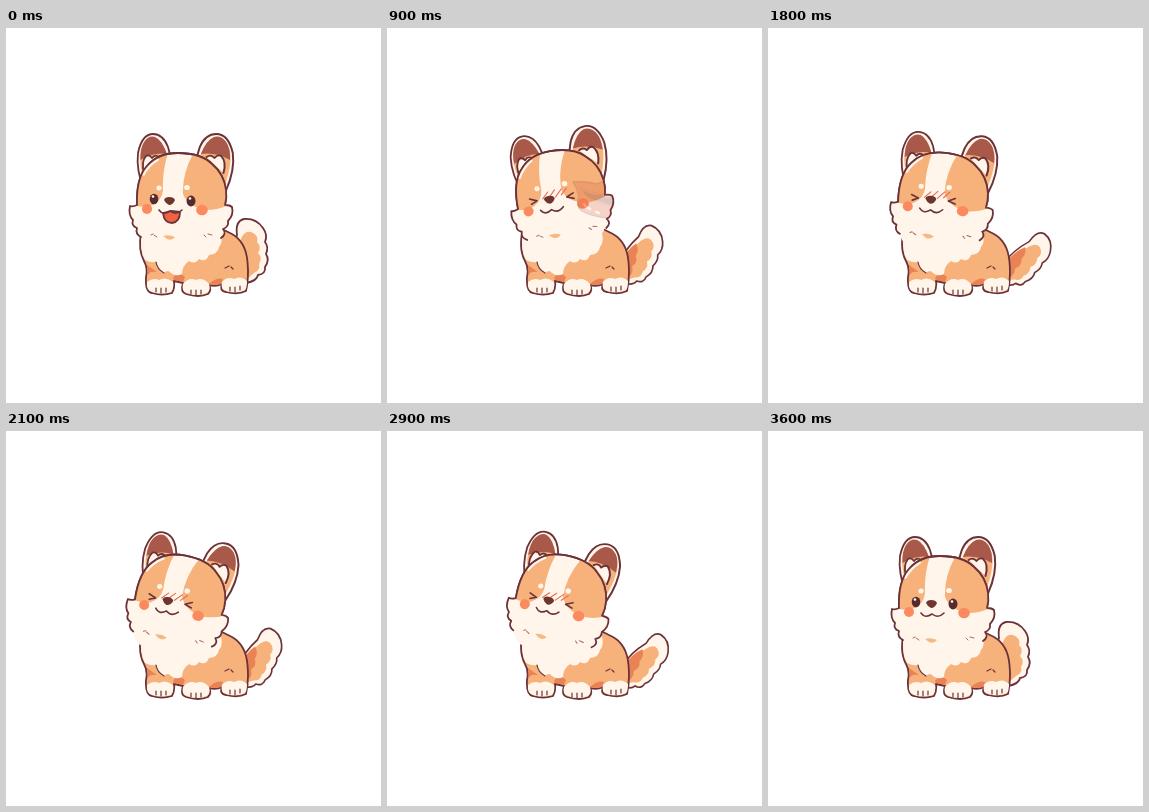
Recreate the animation shown at these times as an HTML page. Size 375 by 375 pixels, loop 3750 ms.

```html
<!DOCTYPE html>
<html lang="en">
<head>
<meta charset="utf-8">
<title>Kissed puppy</title>
<style>
html, body { margin: 0; width: 100%; height: 100%; overflow: hidden; background: #fff; }
svg { display: block; width: 100%; height: 100%; }
.line { stroke: #6b3339; stroke-width: 1.8; stroke-linecap: round; stroke-linejoin: round; }
.thin { fill: none; stroke: #6b3339; stroke-width: 1.2; stroke-linecap: round; stroke-linejoin: round; }
.fur { fill: #f7b27b; }
.shade { fill: #e98356; }
.cream { fill: #fff5ea; }
.dark { fill: #582a2e; }
.blush { fill: #fb8a5e; }
.none { fill: none; }
</style>
</head>
<body>
<svg viewBox="0 0 375 375">
  <defs>
    <g id="ear">
      <path class="cream line" d="M138 162Q130 142 132 125Q136 106 147 106Q157 106 162 119L165 130L150 148Z"/>
      <path class="fur" d="M139 156Q132 134 135 122Q140 108 148 109Q156 111 162 129L148 148Z"/>
      <path fill="#a9594a" d="M134.500 132Q134 120 138 114Q143 107 149 109Q156 112 161 126Q148 124 134.500 132Z"/>
    </g>
    <path id="tuft" class="cream line" d="M138 145Q135 134 140 128Q143 126 146 130Q149 126 153 129"/>
    <path id="face" d="M135 209Q129 206 131 200Q125 198 127 192Q122 187 124 178Q127 179 131 177Q130 150 141 138Q152 125 172 125Q195 125 206 136Q218 146 220 162Q221 170 219 177Q224 177 226 179Q228 187 222 193Q223 199 217 201Q221 206 215 210"/>
    <g id="lips">
      <path fill="#d64b3e" stroke="#702a27" stroke-width="1.3" stroke-linejoin="round" d="M186 154Q198 153 210 156Q215 152 222 157Q230 153 236 160Q238 172 243 181Q233 187 222 190Q205 189 195 183Q188 178 192 168Q190 160 186 154Z"/>
      <path fill="#b53730" d="M190 157Q203 163 215 165Q229 168 240 180Q224 181 211 176Q198 172 190 157Z"/>
      <path fill="#451619" d="M196 163Q208 169 214 166Q219 171 224 170L236 178Q222 178 212 173Q202 172 196 163Z"/>
      <path fill="none" stroke="#ffe9e2" stroke-width="2.4" stroke-linecap="round" d="M197 176Q199 180 203 181M209 184L212 185M227 162L231 164"/>
    </g>
    <clipPath id="skull"><path d="M131 182Q130 150 141 138Q152 125 172 125Q195 125 206 136Q218 146 220 162Q221 170 219 184Z"/></clipPath>
    <clipPath id="onFace"><use id="faceMask" href="#face"/></clipPath>
  </defs>

  <g id="tail">
    <path class="cream line" d="M226 240Q224 224 231 207Q229 193 238 191Q250 190 257 200Q262 207 259 214Q263 219 260 226Q264 232 259 239Q260 246 252 247Q251 253 240 255Z"/>
    <path class="fur" d="M228 240Q226 222 234 213Q238 202 245 204Q253 207 251 214Q256 219 252 225Q257 230 253 236Q255 242 248 245L239 253Z"/>
    <path class="shade" d="M227 240Q226 224 232 214Q239 218 238 225Q244 230 240 236Q247 243 239 253Z"/>
  </g>

  <path class="fur line" d="M135 205Q132 222 138 233Q142 240 140 249Q139 264 146 265Q156 268 166 265Q169 260 168 253L177 255Q174 264 180 266Q193 270 202 266Q206 262 203 257Q210 259 216 256Q213 263 220 264Q232 267 240 263Q243 250 241.500 234Q240 214 226 206L214 200"/>
  <path class="shade" d="M167 250Q172 242 179 249L177 254L168 252ZM203 256Q211 249 217 251L215 256Q209 258 203 256ZM141 237L151 244Q143 243 142 247Z"/>
  <path class="cream" d="M136 204Q133 222 139 232Q145 235 150 234Q151 241 158 245Q162 241 165 245Q170 249 176 246Q176 238 183 233Q189 237 193 231Q200 235 203 227Q212 226 213 219Q218 214 214 202Z"/>
  <path class="thin" d="M150 234Q151 241 158 245"/>
  <g class="cream">
    <path d="M141 254Q147 249 153 252Q160 248 167 254Q168 260 165 264Q155 267 146 264Q140 262 141 254Z"/>
    <path d="M177 256Q183 249 190 252Q197 249 203 256Q205 262 201 265Q190 269 181 265Q175 263 177 256Z"/>
    <path d="M216 254Q221 248 228 251Q235 247 241 253Q241 260 239 262Q230 266 220 263Q214 261 216 254Z"/>
  </g>
  <path class="thin" d="M150 260V264M155 260V265M160 260V264M185 262V266M190 262V267M195 262V266M224 259V263M229 259V264M234 258V262M219 240L223 238M225 239L227 241"/>

  <g id="head">
    <use href="#ear"/>
    <use href="#ear" transform="translate(372 0) scale(-1.1 1)"/>
    <use href="#tuft"/>
    <use href="#tuft" transform="translate(372 0) scale(-1.12 1)"/>
    <path class="cream" d="M134 200Q134 218 147 222Q172 230 202 221Q215 214 216 200Z"/>
    <use href="#face" class="cream line"/>
    <g clip-path="url(#skull)">
      <path class="fur" d="M162 125Q138 128 131 150V178Q140 180 147 177Q156 172 157 162Q156 144 162 125ZM187 126Q176 146 177 166Q182 179 200 182Q212 182 222 177V150Q210 127 187 126Z"/>
      <path fill="none" stroke="#fff5ea" stroke-width="4.600" d="M136 147Q141 137 152 130"/>
    </g>
    <path class="none line" d="M131 177Q130 150 141 138Q152 125 172 125Q195 125 206 136Q218 146 220 162Q221 170 219 177"/>
    <ellipse class="cream" cx="153" cy="160" rx="2.6" ry="2.5"/>
    <ellipse class="cream" cx="181" cy="159.5" rx="2.8" ry="2.6"/>
    <ellipse class="blush" cx="141" cy="181" rx="5" ry="5"/>
    <ellipse class="blush" cx="196" cy="182" rx="5.8" ry="5.2"/>
    <g id="eyesOpen">
      <ellipse class="dark" cx="148" cy="171" rx="4.3" ry="5.3"/>
      <ellipse class="dark" cx="185" cy="173" rx="4.5" ry="5.4"/>
      <g fill="#fff"><circle cx="147" cy="168.5" r="1.3"/><circle cx="184" cy="170.5" r="1.3"/></g>
    </g>
    <g id="eyesShut">
      <path class="thin" style="stroke-width:1.6" d="M144 169L151 172L145 174.500M188 170L181 173L188 175.500"/>
      <path fill="none" stroke="#e9684f" stroke-width="1.1" stroke-linecap="round" d="M157 171L163 165M163 171L170 164M170 171L177 164M176 170L182 164"/>
    </g>
    <path id="mouthOpen" class="line" fill="#ef6340" d="M157 185Q158 195 166 195Q174 194 174 184L165 183Z"/>
    <path class="thin" style="stroke-width:1.6" d="M153 182Q157 188 164 183Q170 188 176 182"/>
    <path fill="#6f3630" d="M158 172Q159 169 163 169Q168 169 169 172Q167 177 163 177Q160 176 158 172Z"/>
    <path fill="#f7b983" d="M157 208Q163 206 169 209Q166 213 161 211Z"/>
    <path class="thin" style="stroke:#a66b60;stroke-width:1" d="M145 207L147 206M148 207L151 209M198 207L200 209M202 206L206 207"/>
  </g>

  <g id="kisses">
    <use id="kissRight" href="#lips"/>
    <use id="kissLeft" href="#lips" transform="translate(330 -8) scale(-1 1)"/>
  </g>
</svg>
<script>
const LOOP = 3750, STEP = 50;
const tilts = [[0, 0], [350, -9.3], [1020, -9.3], [1390, 0], [1560, 0], [2130, 10.3],
               [2300, 11.2], [2900, 11.5], [3220, 10.7], [3590, 0], [LOOP, 0]];
const part = id => document.getElementById(id);
const show = (id, on) => part(id).style.display = on ? "" : "none";
const clamp = x => Math.max(0, Math.min(1, x));
const smooth = x => x * x * (3 - 2 * x);

function tiltAt(t) {
  const i = tilts.findIndex(key => key[0] > t);
  const [t0, a] = tilts[i - 1], [t1, b] = tilts[i];
  return a + (b - a) * smooth((t - t0) / (t1 - t0));
}

function wagAt(t) {
  const phase = (t - 655) / 338;
  return phase > 0 && phase < 7 ? (1 - Math.cos(2 * Math.PI * phase)) / 2 : 0;
}

// Lips land at full strength, then fade away.
const kissAt = (t, start) => t < start ? 0 : 1 - clamp((t - start - 200) / 250);

function draw(t) {
  const tilt = tiltAt(t), lean = Math.abs(tilt), wag = wagAt(t);
  const pose = `translate(${-0.15 * lean} ${-0.2 * lean}) rotate(${tilt} 168 171)`;
  part("head").setAttribute("transform", pose);
  part("faceMask").setAttribute("transform", pose);
  part("tail").setAttribute("transform",
    `translate(238 248) rotate(${48 * wag}) scale(${1 - 0.16 * wag} 1) translate(-238 -248)`);

  const shut = t >= 500 && t < 3450;
  show("eyesShut", shut);
  show("eyesOpen", !shut);
  show("mouthOpen", t < 500);

  const right = kissAt(t, 500), left = kissAt(t, 2150);
  part("kissRight").style.opacity = right;
  part("kissLeft").style.opacity = left;
  // Faint lips only remain visible on the fur.
  part("kisses").style.clipPath = Math.max(right, left) < 0.5 ? "url(#onFace)" : "none";
}

const start = performance.now();
function tick() {
  const t = (performance.now() - start) % LOOP;
  draw(Math.floor(t / STEP) * STEP);
  requestAnimationFrame(tick);
}
tick();
</script>
</body>
</html>
```
